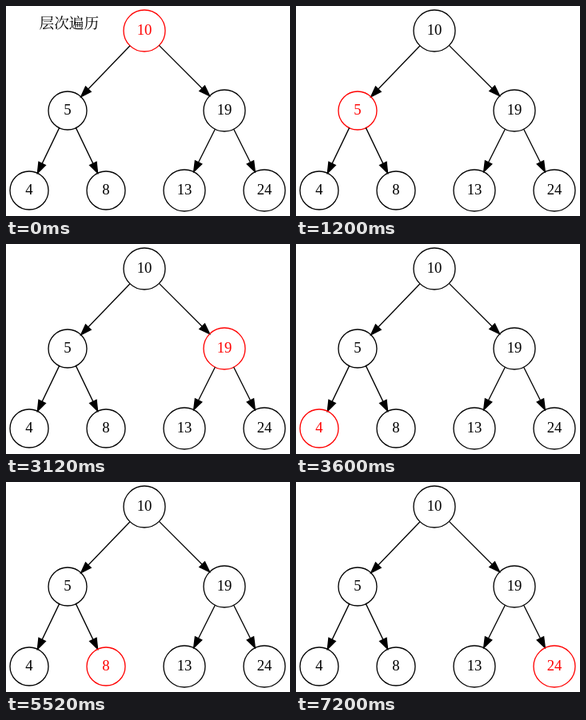
Write an HTML page with a canvas that moves like this. It is 355 by 263 pixels and loops after 8.4 s.

```html
<!DOCTYPE html>
<html lang="zh">
<head>
<meta charset="utf-8">
<style>
  html, body { margin: 0; width: 100%; height: 100%; overflow: hidden; background: #fff; }
  canvas { display: block; }
</style>
</head>
<body>
<canvas width="355" height="263"></canvas>
<script>
const ctx = document.querySelector('canvas').getContext('2d');
const STEP = 1200;

// Nodes in level order: the children of i are 2i + 1 and 2i + 2.
const nodes = [
  [10, 173, 31, 26],
  [5, 77, 131, 24], [19, 273, 131, 26],
  [4, 29, 231, 24], [8, 125, 231, 24], [13, 223, 231, 26], [24, 323, 231, 26]
].map(([value, x, y, r]) => ({ value, x, y, r }));

function drawNode({ value, x, y, r }, color) {
  ctx.strokeStyle = ctx.fillStyle = color;
  ctx.beginPath();
  ctx.arc(x, y, r, 0, 2 * Math.PI);
  ctx.stroke();
  ctx.font = '18.67px "Liberation Serif", serif';
  ctx.textAlign = 'center';
  ctx.fillText(value, x, y + 5);
}

function drawArrow(from, to) {
  const dx = to.x - from.x, dy = to.y - from.y;
  const tip = Math.hypot(dx, dy) - to.r;
  const base = tip - 13.33;
  ctx.save();
  ctx.translate(from.x, from.y);
  ctx.rotate(Math.atan2(dy, dx));
  ctx.strokeStyle = ctx.fillStyle = '#000';
  ctx.beginPath();
  ctx.moveTo(from.r, 0);
  ctx.lineTo(base, 0);
  ctx.stroke();
  ctx.beginPath();
  ctx.moveTo(tip, 0);
  ctx.lineTo(base, 4.67);
  ctx.lineTo(base, -4.67);
  ctx.closePath();
  ctx.fill();
  ctx.stroke();
  ctx.restore();
}

function draw(time) {
  const active = Math.floor(time / STEP) % nodes.length;
  ctx.fillStyle = '#fff';
  ctx.fillRect(0, 0, 355, 263);
  ctx.lineWidth = 1.33;
  nodes.forEach((node, i) => {
    if (i) drawArrow(nodes[(i - 1) >> 1], node);
    drawNode(node, i === active ? '#f00' : '#000');
  });
  if (active === 0) {
    ctx.fillStyle = '#000';
    ctx.font = '300 18.67px "Noto Serif CJK SC", "Noto Sans CJK SC", "Noto Sans CJK", serif';
    ctx.textAlign = 'left';
    ctx.fillText('层次遍历', 41.5, 28);
  }
}

const start = performance.now();
function tick() {
  draw(performance.now() - start);
  requestAnimationFrame(tick);
}
tick();
</script>
</body>
</html>
```
